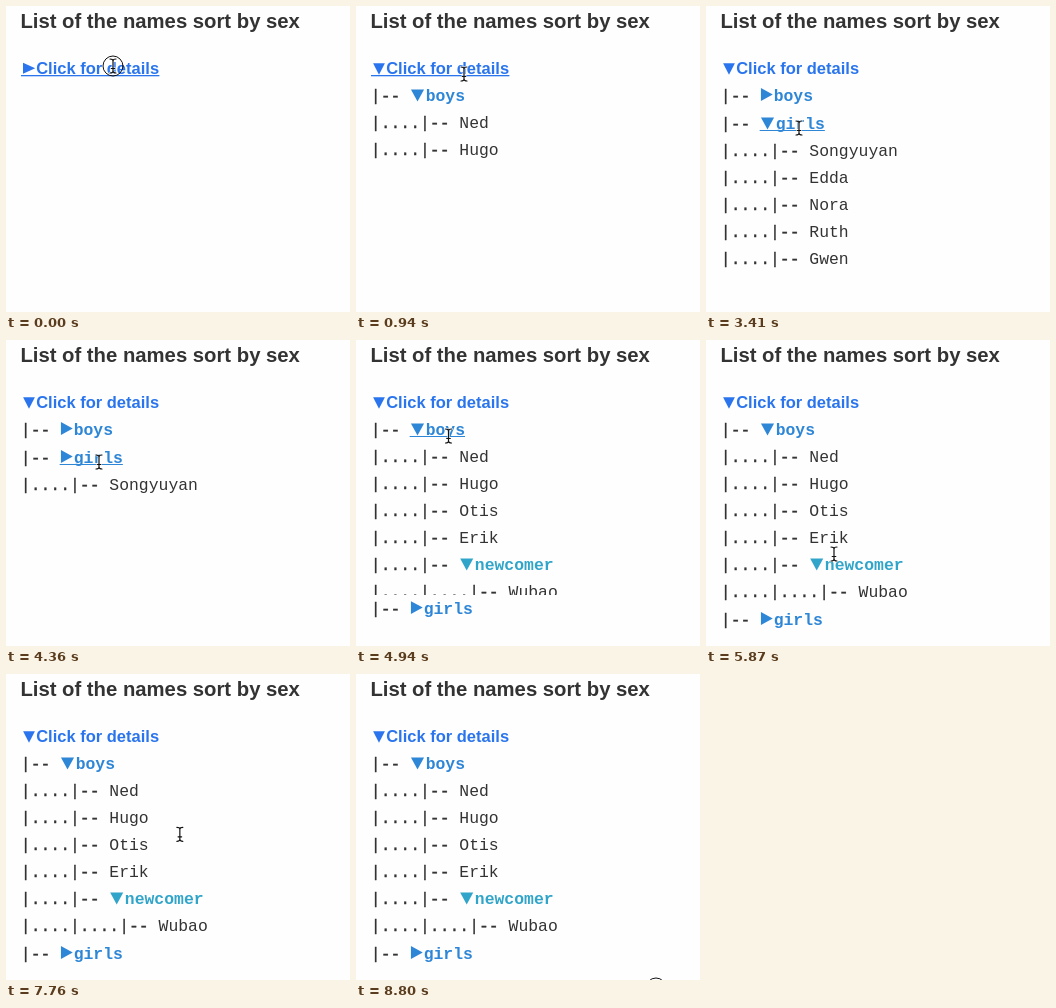
Animation of 344x306 px, one loop 8.9 s. Source, as an HTML page:

```html
<!DOCTYPE html>
<html lang="en">
<head>
<meta charset="utf-8">
<title>Collapsible name list</title>
<style>
  html, body { margin: 0; width: 100%; height: 100%; overflow: hidden; background: #fefefe; }
  svg { display: block; width: 344px; height: 306px; }
  text { white-space: pre; }
  .sans { font-family: Helvetica, Arial, "Liberation Sans", sans-serif; font-weight: bold; }
  .mono { font-family: "Courier New", "Liberation Mono", monospace; font-size: 16.4px; fill: #333; }
  .mono.link { font-weight: bold; }
  .mono.lead { stroke: #333; stroke-width: 0.3px; }
</style>
</head>
<body>
<svg id="stage" viewBox="0 0 344 306" width="344" height="306"></svg>
<script>
const LOOP = 8900, STEP = 117.3, STEP_LEAD = 12, SLIDE = 200;
const ROW = 27, GROUP_GAP = 1, CHAR = 9.84, LEFT = 14.8, ASCENT = 18, TOP = 77;
const svg = document.getElementById('stage');

function el(tag, attrs, parent, text) {
  const node = document.createElementNS('http://www.w3.org/2000/svg', tag);
  for (const key in attrs) node.setAttribute(key, attrs[key]);
  if (text) node.textContent = text;
  parent.appendChild(node);
  return node;
}
const show = (node, on) => node.setAttribute('visibility', on ? 'inherit' : 'hidden');
const shift = (node, x, y) => node.setAttribute('transform', `translate(${x} ${y})`);

// Each toggle lists the start times of its slides; it flips at every one.
const tree = {
  toggles: [855], open: false, children: [
    { label: 'boys', color: '#2e86d6', open: true, toggles: [2627, 4760], gap: GROUP_GAP, children: [
      { label: 'Ned' }, { label: 'Hugo' }, { label: 'Otis' }, { label: 'Erik' },
      { label: 'newcomer', color: '#30a5c9', open: true, toggles: [6150, 6564],
        children: [{ label: 'Wubao' }] }
    ] },
    { label: 'girls', color: '#2e86d6', open: false, toggles: [3195, 4200], children: [
      { label: 'Songyuyan' }, { label: 'Edda' }, { label: 'Nora' }, { label: 'Ruth' }, { label: 'Gwen' }
    ] }
  ]
};

// Pointer path: time, x, y
const path = [
  [0, 107, 60], [120, 107, 61], [350, 106, 77], [560, 108, 80], [760, 108, 68], [940, 108, 68],
  [1300, 110, 69], [1800, 101, 82], [2230, 97, 91], [2700, 96, 92], [2815, 95, 97], [3050, 93, 122],
  [4400, 93, 122], [4640, 92.5, 96], [5040, 92.5, 96], [5865, 128, 214], [5980, 130, 224], [6120, 130, 224],
  [6450, 130, 222], [6680, 130, 223], [6920, 130, 223], [7270, 172, 164], [7640, 172, 164],
  [7860, 176, 156], [8440, 300, 314]
];
// Intervals with the mouse button down
const presses = [[0, 100], [730, 850], [2340, 2500], [3240, 3390], [4100, 4200],
  [4640, 4760], [5975, 6150], [6440, 6560], [8790, 8900]];

let clipCount = 0;
function build(node, parent, depth) {
  if (depth) {
    node.row = el('g', {}, parent);
    const textX = LEFT + CHAR * (depth * 5 - 1);
    el('text', { class: 'mono lead', x: LEFT }, node.row, '|....'.repeat(depth - 1) + '|--');
    const attrs = node.children
      ? { class: 'mono link', style: `fill:${node.color}` }
      : { class: 'mono', x: textX };
    node.text = el('text', attrs, node.row, node.label);
    if (node.children) {
      node.x = textX - 1;
      const marks = el('g', { fill: node.color }, node.row);
      shift(marks, node.x, 0);
      node.down = el('polygon', { points: '1.8,-11.5 14.9,-11.5 8.35,0.5' }, marks);
      node.right = el('polygon', { points: '1.8,-12.9 13.6,-6.5 1.8,-0.1' }, marks);
      node.line = el('rect', { x: node.x + 0.5, y: 1, height: 1, fill: node.color }, node.row);
    }
  }
  if (!node.children) return;
  const id = 'clip' + clipCount++;
  node.clip = el('rect', { x: 0, width: 344 }, el('clipPath', { id }, svg));
  node.group = el('g', { 'clip-path': `url(#${id})` }, parent);
  node.children.forEach(child => build(child, node.group, depth + 1));
}

function slideState(node, t) {
  const started = node.toggles.filter(start => t >= start);
  const open = node.open !== (started.length % 2 === 1);
  if (!started.length) return { open, part: open ? 1 : 0 };
  const p = Math.min(1, (t - started[started.length - 1]) / SLIDE);
  const eased = 0.5 - Math.cos(Math.PI * p) / 2;
  return { open, part: open ? eased : 1 - eased };
}

// Places a node with its row top at y and returns the height it takes up.
function layout(node, y, t, mouse) {
  let used = 0;
  const state = node.children && slideState(node, t);
  if (node.row) {
    const base = y + ASCENT;
    shift(node.row, 0, base);
    used = ROW;
    if (state) {
      const textX = node.x + (state.open ? 16.5 : 14.5);
      const end = textX + node.label.length * CHAR;
      node.text.setAttribute('x', textX);
      node.line.setAttribute('width', end - node.x - 0.5);
      show(node.down, state.open);
      show(node.right, !state.open);
      show(node.line, Math.abs(mouse.y - base + 4) < 9 && mouse.x > node.x && mouse.x < end);
    }
  }
  if (state) {
    let inner = 0;
    for (const child of node.children) inner += layout(child, y + used + inner, t, mouse);
    const height = inner * state.part;
    node.clip.setAttribute('y', y + used);
    node.clip.setAttribute('height', height);
    show(node.group, height > 0);
    used += height;
  }
  return used + (node.gap || 0);
}

function pointerAt(t) {
  const i = path.findIndex(key => key[0] > t);
  if (i < 0) return { x: path[path.length - 1][1], y: path[path.length - 1][2] };
  const [t0, x0, y0] = path[i - 1], [t1, x1, y1] = path[i];
  const p = (t - t0) / (t1 - t0);
  return { x: x0 + (x1 - x0) * p, y: y0 + (y1 - y0) * p };
}

el('text', { class: 'sans', x: 14.4, y: 22, 'font-size': 20.3, fill: '#333' }, svg,
  'List of the names sort by sex');
const head = el('g', { fill: '#2a75ed' }, svg);
el('text', { class: 'sans', x: 30.2, y: 68, 'font-size': 16.5 }, head, 'Click for details');
const headRight = el('polygon', { points: '17,56.8 29.2,62.3 17,67.8' }, head);
const headDown = el('polygon', { points: '17.1,57.2 28.9,57.2 23,68.8' }, head);
const headLine = el('rect', { x: 15, y: 69, width: 138.4, height: 1.3 }, head);
build(tree, svg, 0);

const pointer = el('g', { fill: 'none', 'stroke-linecap': 'round' }, svg);
const beam = 'M-3-7Q0-7 0-5Q0-7 3-7M0-5.2V5.2M-3 7Q0 7 0 5Q0 7 3 7M-1.8 2.5H1.8';
el('path', { d: beam, stroke: '#fff', 'stroke-width': 2.6, 'stroke-opacity': 0.8 }, pointer);
el('path', { d: beam, stroke: '#111', 'stroke-width': 1.2 }, pointer);
const ring = el('circle', { r: 10, stroke: '#111', 'stroke-width': 1 }, pointer);

function draw(time) {
  const t = Math.floor((time % LOOP + STEP_LEAD) / STEP) * STEP;
  const mouse = pointerAt(t);
  const open = slideState(tree, t).open;
  show(headDown, open);
  show(headRight, !open);
  show(headLine, mouse.y > 53 && mouse.y < 74 && mouse.x > 15 && mouse.x < 153);
  layout(tree, TOP, t, mouse);
  shift(pointer, mouse.x, mouse.y);
  show(ring, presses.some(([from, to]) => t >= from && t < to));
}

const start = performance.now();
function tick() {
  draw(performance.now() - start);
  requestAnimationFrame(tick);
}
tick();
</script>
</body>
</html>
```
